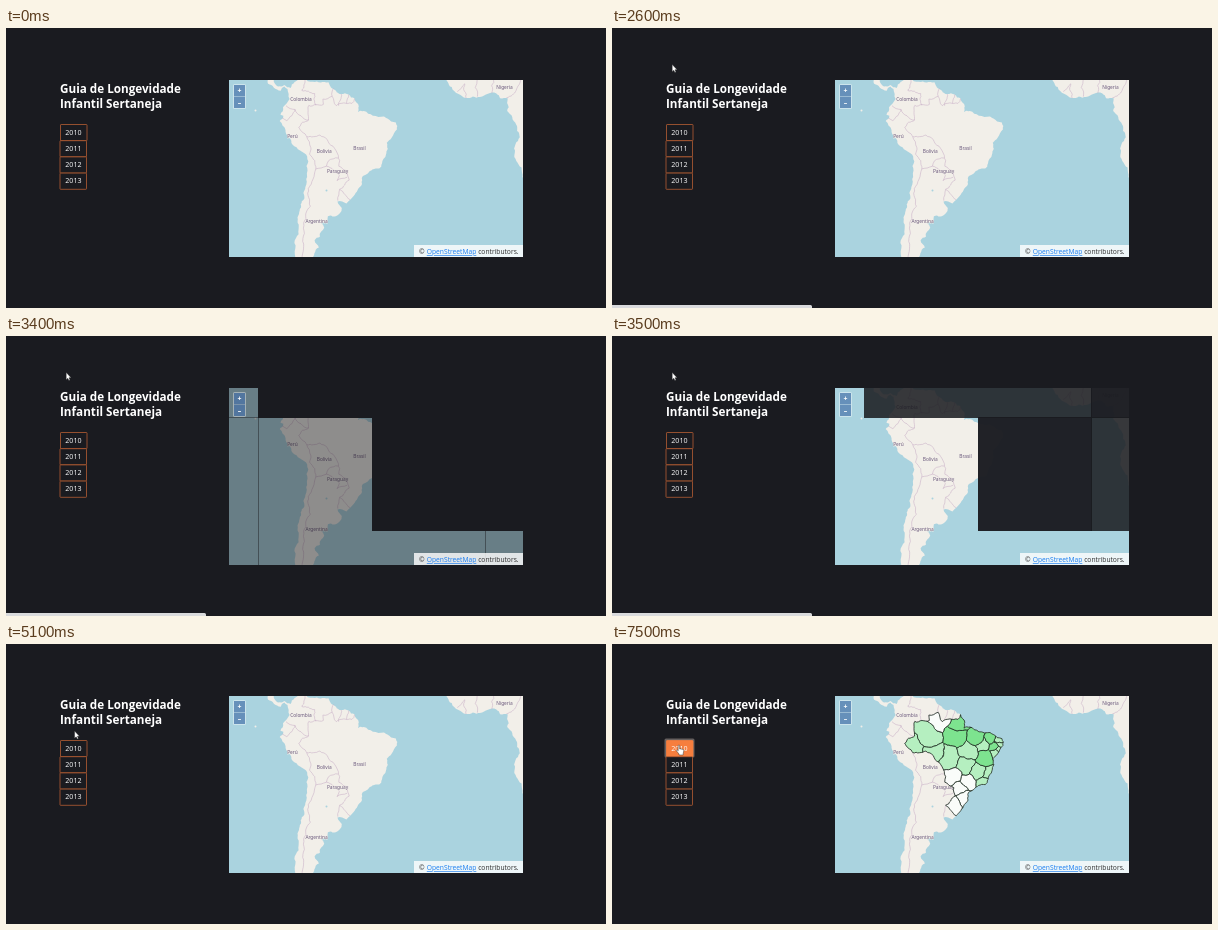
An HTML page that plays this animation: 600 by 280 pixels, repeating every 8 s.

```html
<!DOCTYPE html>
<html lang="pt-BR">
<head>
<meta charset="utf-8">
<title>Mapa</title>
<style>
html, body { margin: 0; width: 100%; height: 100%; overflow: hidden; background: #1a1b20; }
svg { display: block; width: 100vw; height: 100vh; }
text { font-family: "Open Sans", "Noto Sans", sans-serif; }
.title { font-size: 11.7px; font-weight: 700; fill: #fff; }
.year { font-size: 7.1px; fill: #fff; text-anchor: middle; }
.label { font-family: "Noto Sans", sans-serif; font-size: 4.8px; fill: #6a587c; text-anchor: middle; stroke: #f2efe9; stroke-width: .8px; paint-order: stroke; }
.credit { font-size: 6.7px; fill: #2b2b2b; }
.link { fill: #1a7df0; text-decoration: underline; }
.zoom { font-size: 7px; font-weight: 700; fill: #fff; text-anchor: middle; }
</style>
</head>
<body>
<svg viewBox="0 0 600 280">
  <defs>
    <clipPath id="frame"><rect x="223" y="52" width="294" height="177"/></clipPath>
    <clipPath id="country"></clipPath>
  </defs>
  <text class="title" x="54" y="65">Guia de Longevidade</text>
  <text class="title" x="54" y="79.6">Infantil Sertaneja</text>
  <g id="buttons"></g>
  <g clip-path="url(#frame)">
    <g id="map">
      <rect x="220" y="50" width="300" height="182" fill="#aad3df"/>
      <g id="land" fill="#f2efe9"></g>
      <g id="borders" fill="none" stroke="#c8aec6" stroke-width=".55"></g>
      <g id="labels"></g>
      <g id="states" stroke="#1c2b20" stroke-width=".8" stroke-linejoin="round">
        <g id="cells" clip-path="url(#country)"></g>
      </g>
    </g>
    <g id="covers" fill="#1a1b20" shape-rendering="crispEdges"></g>
  </g>
  <rect x="227" y="56" width="13" height="25" rx="1.6" fill="#fff" fill-opacity=".4"/>
  <path d="M228 57H239V68.2H228ZM228 68.8H239V80H228Z" fill="#003c88" fill-opacity=".5"/>
  <text class="zoom" x="233.5" y="65.4">+</text>
  <text class="zoom" x="233.5" y="76.6">–</text>
  <rect x="408" y="217" width="109" height="12" fill="#fff" fill-opacity=".8"/>
  <text class="credit" x="413" y="226">©</text>
  <text class="credit link" x="420.8" y="226">OpenStreetMap</text>
  <text class="credit" x="472.2" y="226">contributors.</text>
  <g id="status">
    <path d="M0 277H198.5a1.5 1.5 0 0 1 1.5 1.5V280H0Z" fill="#d9dadc"/>
    <text x="1" y="284" font-size="6" fill="#6a6d72">Aguardando local...</text>
  </g>
  <path id="arrow" d="M0 0V7.2L1.6 5.8L2.7 8L3.8 7.5L2.8 5.2H4.9Z" fill="#fff" stroke="#222" stroke-width=".4"/>
  <path id="hand" d="M-.8 .8C-.8-.2 .7-.2 .7 .8V4L2 3.7L2.2 4.2L3.4 4L3.7 4.6C4.5 4.4 4.9 4.8 4.8 5.7L4.2 8.7V10H0V9L-2.4 6C-2.9 5-1.9 4.6-.8 5.8Z" fill="#fff" stroke="#333" stroke-width=".5"/>
</svg>
<script>
const LOOP = 8000, STEP = 100;
const $ = id => document.getElementById(id);
const clamp = v => Math.max(0, Math.min(1, v));
const show = (el, on) => el.setAttribute("visibility", on ? "visible" : "hidden");

function add(parent, tag, attrs, text) {
  const el = document.createElementNS("http://www.w3.org/2000/svg", tag);
  for (const k in attrs) el.setAttribute(k, attrs[k]);
  if (text) el.textContent = text;
  parent.appendChild(el);
  return el;
}

// "lon,lat lon,lat" to stage points, Web Mercator
const project = list => list.trim().split(/\s+/).map(pair => {
  const [lon, lat] = pair.split(",").map(Number);
  return [479 + lon * 2.525, 81.2 - 144.7 * Math.log(Math.tan(Math.PI / 4 + lat * Math.PI / 360))];
});

// Midpoint displacement; the same for both directions, so shared edges meet
function rough(a, b) {
  const dx = b[0] - a[0], dy = b[1] - a[1];
  if (Math.hypot(dx, dy) < 3) return [b];
  const hash = Math.sin((a[0] + b[0]) * 1.7 + (a[1] + b[1]) * 2.9) * 437;
  const bend = (hash - Math.floor(hash) - .5) * .3 * (dx < 0 || (dx === 0 && dy < 0) ? -1 : 1);
  const mid = [(a[0] + b[0]) / 2 - dy * bend, (a[1] + b[1]) / 2 + dx * bend];
  return [...rough(a, mid), ...rough(mid, b)];
}

function outline(points, closed) {
  const ends = closed ? [...points, points[0]] : points;
  const path = ends.slice(1).flatMap((p, i) => rough(ends[i], p));
  return "M" + [ends[0], ...path].map(p => p.map(v => v.toFixed(1)).join(" ")).join("L") + (closed ? "Z" : "");
}

const pacific = `-85.8,13 -85.9,10 -83.7,8.6 -80.9,7.3 -79.5,8.9 -78.2,8 -77.4,4 -80,.8 -81,-2.2 -79.9,-2.6 -81.3,-4.7
  -79,-8.2 -76.2,-13.9 -70.4,-18.4 -70.5,-25.4 -71.6,-33.5 -73.4,-37.2 -73.8,-41.5 -75.5,-46.7 -75,-52.5`;
const atlantic = `-69,-52.5 -67.6,-49.5 -65.8,-47.9 -67.5,-46 -65.4,-45 -63.7,-42.4 -65,-41 -62.3,-40.6 -62.2,-39
  -57.6,-38.1 -56.7,-36.4 -58.4,-34.3 -54.9,-34.9`;
const brazilCoast = `-53.4,-33.7 -50.2,-30 -48.7,-28.4 -48.5,-25.7 -44.6,-23.2 -41.9,-22.9 -40.8,-21 -39.2,-17.7 -38.9,-13.2
  -37,-11.2 -34.9,-8 -35.3,-5.3 -37.2,-4.9 -40,-2.9 -44.4,-2.6 -48,-.7 -50.3,-1.2 -50,1.2 -51.7,4.2`;
const caribbean = `-54,5.8 -57,6 -61,8.6 -62,10.6 -68.2,10.8 -71.8,12.1 -75.4,10.7 -77,8.4 -79.5,9.5 -82,9 -83.7,11 -83.5,13`;
const africa = `-16,13 -13.2,8.7 -7.5,4.4 -2,4.8 1.2,6.1 4.4,6.3 6,4.3 9,4.3 9.4,.8 8.8,-.7 12.3,-6 13.8,-11 11.8,-17
  14.5,-22.5 14.8,-26 18,-26 18,13`;
const brazilInland = `-51.7,4.2 -52.7,2.3 -58.9,1.4 -60.5,5.1 -64.2,4 -64,1.9 -69.8,1.5 -69.9,-4.3 -73.8,-7.2 -70.6,-10.8
  -65.4,-10.2 -60.2,-14.5 -58.1,-18 -57.9,-22 -54.3,-24 -53.8,-27 -57.6,-30.2 -53.4,-33.7`;

[pacific + " " + atlantic + " " + brazilCoast + " " + caribbean, africa]
  .forEach(list => add($("land"), "path", { d: outline(project(list), true) }));
add($("land"), "circle", { cx: 249.5, cy: 82.5, r: 1 });
add($("land"), "circle", { cx: 320.5, cy: 162.6, r: 1, fill: "#aad3df" });

[ brazilInland,
  "-71.4,11.8 -72.5,7.4 -67.5,6.2 -67,1.5",
  "-78.8,1.4 -75.2,-.1 -69.9,-4.3",
  "-80.3,-3.4 -78.5,-4.5 -75.2,-.1",
  "-70.6,-10.8 -69,-15 -69.5,-17.5 -67,-23 -62.8,-22 -62,-20 -58.1,-19",
  "-62.8,-22 -57.7,-25.3 -58.6,-27.2 -54.6,-26",
  "-67,-23 -70,-30 -71.8,-41 -71.8,-47 -73,-52",
  "-57.6,-30.2 -58.3,-34",
  "-60.5,5.1 -59.8,8.3", "-58,1.4 -57,6", "-54.8,2.3 -54,5.8",
  "-11,7 -8,10 -7.5,4.4", "-3,5 -3,12", "2.7,6.3 3.6,12", "8.5,4.6 14,12"
].forEach(list => add($("borders"), "path", { d: outline(project(list)) }));

[["Colombia", 295, 73], ["Perú", 286.5, 109.5], ["Bolivia", 318.3, 125.3], ["Brasil", 353.5, 122],
 ["Paraguay", 331.5, 144.6], ["Argentina", 310.5, 195.3], ["Nigeria", 498.5, 60.8]]
  .forEach(([name, x, y]) => add($("labels"), "text", { class: "label", x, y }, name));

// States are Voronoi cells around their centres, clipped to the country
const centres = {
  "#b5efc0": `-64.5,-4.5 -70.3,-9.7 -63,-11.2 -56,-13 -48.3,-10 -42.7,-7.5 -36.7,-5.8 -36.8,-7.1 -36.6,-9.6 -37.3,-10.5
    -49.6,-15.9 -44.6,-18.5 -40.6,-19.6 -42.6,-22.3`,
  "#7de38f": "-53,-4 -52,1.5 -45.3,-5 -39.6,-5.2 -37.9,-8.4 -41.7,-12.5",
  "#fafcfa": "-61.5,2.2 -54.8,-20.4 -48.7,-22.2 -51.6,-24.6 -50.4,-27.2 -53.3,-29.7"
};
const sites = Object.entries(centres).flatMap(([fill, list]) => project(list).map(at => ({ at, fill })));

function cell(site) {
  let poly = [[270, 50], [410, 50], [410, 190], [270, 190]];
  for (const other of sites) {
    if (other === site) continue;
    const [ax, ay] = site.at, [bx, by] = other.at;
    const side = ([x, y]) => (x - bx) ** 2 + (y - by) ** 2 - (x - ax) ** 2 - (y - ay) ** 2;
    poly = poly.flatMap((p, i) => {
      const q = poly[(i + 1) % poly.length], sp = side(p), sq = side(q), k = sp / (sp - sq);
      const cut = sp * sq < 0 ? [[p[0] + (q[0] - p[0]) * k, p[1] + (q[1] - p[1]) * k]] : [];
      return sp >= 0 ? [p, ...cut] : cut;
    });
  }
  return poly;
}

const countryPath = outline(project(brazilInland.replace(/\s+\S+$/, "") + " " + brazilCoast), true);
add($("country"), "path", { d: countryPath });
sites.forEach(s => add($("cells"), "path", { d: outline(cell(s), true), fill: s.fill }));
add($("states"), "path", { d: countryPath, fill: "none" });

const ring = add($("buttons"), "rect", { x: 52.5, y: 94.5, width: 30, height: 19, rx: 1.5, fill: "#66605f" });
const boxes = [0, 1, 2, 3].map(i => {
  const y = 96.5 + i * 16.2;
  const box = add($("buttons"), "rect", { x: i ? 54 : 54.5, y, width: 26.5, height: 16.2, rx: .6, "stroke-width": .75 });
  add($("buttons"), "text", { class: "year", x: 67.4, y: y + 10.2 }, String(2010 + i));
  return box;
});

// Map tiles fade in, the left and bottom ones first
const covers = [];
for (let row = 0; row < 3; row++) for (let col = 0; col < 4; col++) {
  const early = col === 0 || row === 2 || (row === 1 && col === 1);
  covers.push({
    ready: early ? 3290 : row + col === 3 ? 3492 : 3472,
    el: add($("covers"), "rect", { x: Math.round(138.5 + col * 113.5), y: Math.round(-32.5 + row * 113.8), width: 114, height: 114 })
  });
}

// Pointer glides: start, end, from, to, sideways bow
const glides = [
  { t0: 600, t1: 1000, from: [520, 120], to: [233, 84], bow: 0 },
  { t0: 1100, t1: 1800, from: [233, 84], to: [36, -10], bow: 0 },
  { t0: 2300, t1: 2600, from: [57, 12], to: [60.2, 36.5], bow: 0 },
  { t0: 4400, t1: 5400, from: [60.2, 36.5], to: [67, 101], bow: 3.2 }
];

function pointer(t) {
  const g = glides.filter(g => t >= g.t0).pop() || glides[0];
  const k = clamp((t - g.t0) / (g.t1 - g.t0)), e = k * k * (3 - 2 * k);
  return [g.from[0] + (g.to[0] - g.from[0]) * e - g.bow * Math.sin(2 * Math.PI * k), g.from[1] + (g.to[1] - g.from[1]) * e];
}

const mix = (a, b, k) => "rgb(" + a.map((v, i) => Math.round(v + (b[i] - v) * k)) + ")";
const DARK = [26, 27, 32], RUST = [190, 98, 52], ORANGE = [246, 126, 62], FADED = [112, 86, 76];

function render(ms) {
  const t = Math.floor(ms / STEP) * STEP;
  const blank = t === 3200;

  show($("map"), t < 3200 || t >= 3400);
  covers.forEach(c => c.el.setAttribute("opacity", t < 3200 ? 0 : 1 - clamp((t - c.ready) / 205)));
  show($("states"), t >= 7500);

  const hover = clamp((t - 5300) / 200);
  boxes.forEach((box, i) => {
    const k = i ? 0 : hover;
    box.setAttribute("fill", mix(DARK, ORANGE, k));
    box.setAttribute("stroke", blank ? mix(FADED, FADED, 0) : mix(RUST, ORANGE, k));
    box.nextSibling.setAttribute("opacity", blank ? .6 : 1);
  });
  ring.setAttribute("opacity", clamp((t - 5900) / 300));

  show($("status"), t >= 2000 && t < 3900);
  $("status").setAttribute("opacity", 1 - .35 * clamp((t - 3600) / 100) - .35 * clamp((t - 3700) / 100));

  const pointing = t >= 5300;
  show($("arrow"), !pointing && ((t >= 700 && t < 1800) || t >= 2400));
  show($("hand"), pointing);
  $(pointing ? "hand" : "arrow").setAttribute("transform", `translate(${pointer(t)})`);
}

const start = performance.now();
function tick() {
  render((performance.now() - start) % LOOP);
  requestAnimationFrame(tick);
}
tick();
</script>
</body>
</html>
```
